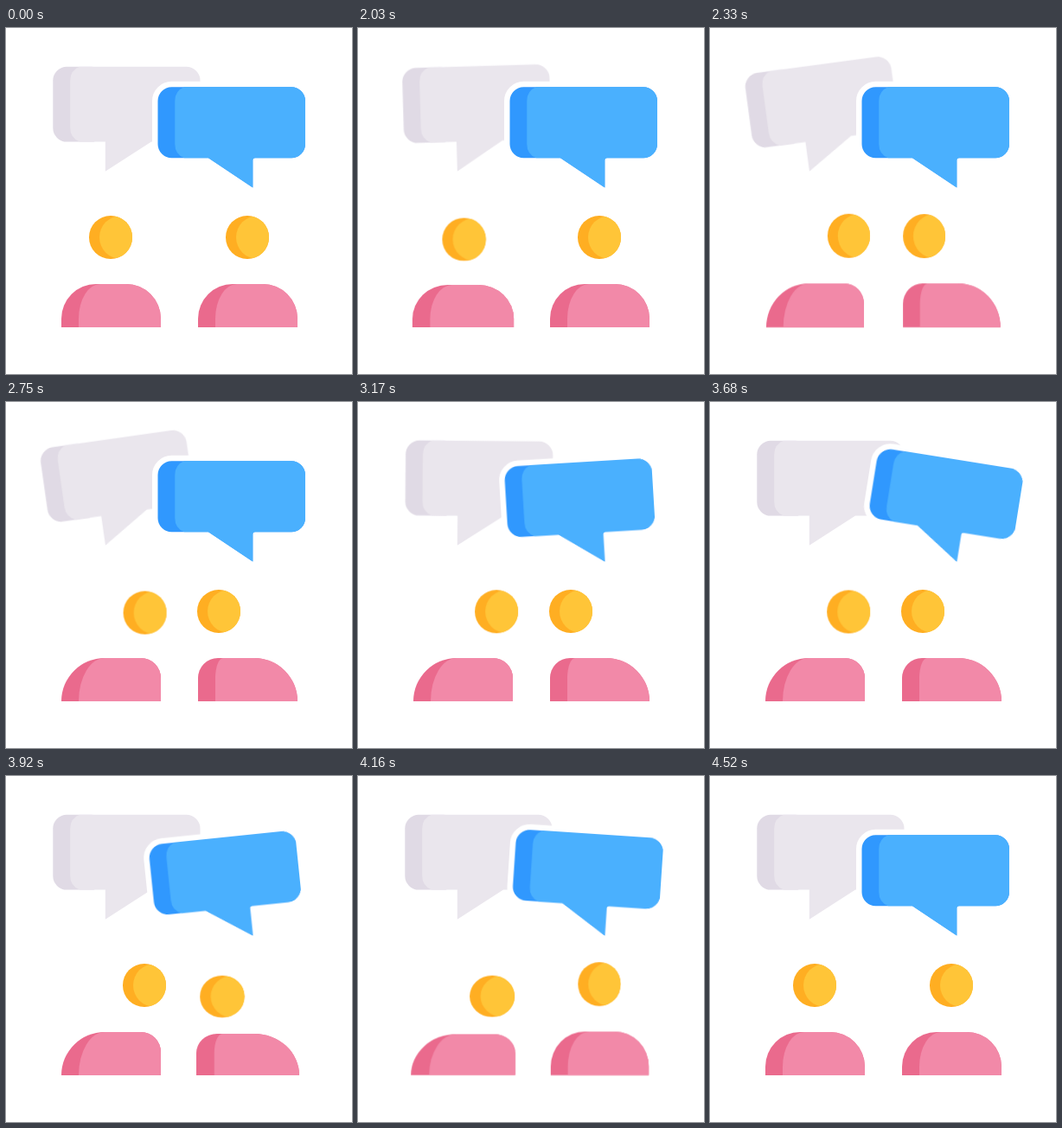
Recreate the animation shown at these times as an HTML page. Size 400x400 px, loop 4.55 s.

```html
<!DOCTYPE html>
<html lang="en">
<head>
<meta charset="utf-8">
<title>Conversation</title>
<style>
  html, body { margin: 0; width: 100%; height: 100%; overflow: hidden; background: #fff; }
  #stage { position: relative; width: 400px; height: 400px; overflow: hidden; }
  svg { position: absolute; inset: 0; }

  .bubble, .head, .body, .body i {
    animation: 4.55s cubic-bezier(.36, 0, .64, 1) infinite;
  }

  /* Bubbles swing around the tip of their tail */
  .bubble { animation-name: swing; }
  .grey { transform-origin: 115px 165px; }
  .blue { transform-origin: 285px 184px; animation-delay: -3.43s; }
  @keyframes swing {
    0% { transform: rotate(0); }
    43.96% { transform: rotate(0); animation-timing-function: cubic-bezier(.3, .1, .6, 1); }
    49.01% { transform: rotate(-18deg); }
    54.73% { transform: rotate(13.5deg); }
    60% { transform: rotate(-8.3deg); }
    65.49% { transform: rotate(4.5deg); }
    70.77%, 100% { transform: rotate(0); }
  }

  .head, .body, .head i, .body i { position: absolute; overflow: hidden; }
  .head { top: 217px; width: 49.5px; height: 49.5px; border-radius: 50%; background: #ffae22; }
  .head i { left: 12px; top: -.5px; width: 50px; height: 50px; border-radius: 50%; background: #ffc538; }
  .body {
    top: 296px; width: 114.5px; height: 49.7px; background: #ea6a8d;
    border-radius: 40px 40px 0 0; transform-origin: 50% 100%;
  }
  .body i { inset: 0 0 0 20px; background: #f289a8; border-radius: 25px 0 0 0 / 40px 0 0 0; }

  .head.left { left: 96.2px; animation-name: head-left; }
  .head.right { left: 254.4px; animation-name: head-right; }
  .body.left { left: 63.8px; animation-name: body-left; }
  .body.right { left: 221.8px; animation-name: body-right; }
  .left i { animation-name: light-left; }
  .right i { animation-name: light-right; }
  .head i { animation: none; }

  @keyframes head-left {
    0% { transform: none; }
    43.96% { transform: translate(0, 0) scale(1); animation-timing-function: cubic-bezier(.4, .2, .7, .9); }
    46.59% { transform: translate(8px, 12px) scale(1.04, .96); }
    50.55% { transform: translate(39.5px, -2px) scale(.98, 1.02); }
    53.63%, 58.9%, 70.33%, 81.76%, 88.57% { transform: translate(39px, 0) scale(1); }
    64.62%, 76.04% { transform: translate(42.5px, 9px) scale(1); }
    91.76% { transform: translate(34px, 13px) scale(1.04, .96); }
    95.38% { transform: translate(0, -2px) scale(.98, 1.02); }
    98.9%, 100% { transform: none; }
  }
  @keyframes head-right {
    0%, 44.62% { transform: translate(0, 0) scale(1); }
    47.25% { transform: translate(-6px, 12px) scale(1.04, .96); }
    51.43% { transform: translate(-31.5px, -1.5px) scale(.98, 1.02); }
    54.51%, 83.52% { transform: translate(-33px, 0) scale(1); }
    86.26% { transform: translate(-29px, 13px) scale(1.03, .97); }
    90.33% { transform: translate(0, -2px) scale(.98, 1.02); }
    93.41%, 100% { transform: none; }
  }

  /* Squash, reshape the shoulders, stretch, settle */
  @keyframes body-left {
    0% { transform: scale(1); border-radius: 40px 40px 0 0; }
    43.96% { transform: scale(1); border-radius: 40px 40px 0 0; animation-timing-function: ease-out; }
    46.59% { transform: scale(1.05, .95); border-radius: 40px 40px 0 0; }
    50.55% { transform: scale(.98, 1.015); border-radius: 50px 23px 0 0; }
    53.63%, 88.57% { transform: scale(1); border-radius: 50px 23px 0 0; }
    91.76% { transform: scale(1.05, .95); border-radius: 50px 23px 0 0; }
    95.38% { transform: scale(.98, 1.015); border-radius: 40px 40px 0 0; }
    98.9%, 100% { transform: scale(1); border-radius: 40px 40px 0 0; }
  }
  @keyframes body-right {
    0%, 44.62% { transform: scale(1); border-radius: 40px 40px 0 0; }
    47.25% { transform: scale(1.05, .95); border-radius: 40px 40px 0 0; }
    51.43% { transform: scale(.98, 1.015); border-radius: 23px 50px 0 0; }
    54.51%, 83.52% { transform: scale(1); border-radius: 23px 50px 0 0; }
    86.26% { transform: scale(1.035, .96); border-radius: 23px 50px 0 0; }
    90.33% { transform: scale(.98, 1.015); border-radius: 40px 40px 0 0; }
    93.41%, 100% { transform: scale(1); border-radius: 40px 40px 0 0; }
  }
  @keyframes light-left {
    0%, 46.59%, 95.38%, 100% { border-radius: 25px 0 0 0 / 40px 0 0 0; }
    50.55%, 91.76% { border-radius: 30px 0 0 0 / 50px 0 0 0; }
  }
  @keyframes light-right {
    0%, 47.25%, 90.33%, 100% { border-radius: 25px 0 0 0 / 40px 0 0 0; }
    51.43%, 86.26% { border-radius: 9px 0 0 0 / 23px 0 0 0; }
  }
</style>
</head>
<body>
<div id="stage">
  <svg width="400" height="400" viewBox="0 0 400 400">
    <g class="bubble grey">
      <rect x="54.3" y="44.8" width="60" height="86.8" rx="16" fill="#e0dae5"/>
      <path fill="#eae6ed" d="M85 44.8H208.5a16 16 0 0 1 16 16V115.600a16 16 0 0 1-16 16H168L114.800 165.800V131.600H85Q74.200 127 74.200 115.600V60.800Q74.200 49 85 44.800Z"/>
    </g>
    <g class="bubble blue">
      <path id="blue" fill="#3098fe" stroke="#fff" stroke-width="13" stroke-linejoin="round" paint-order="stroke"
        d="M191.500 68.300H330a16 16 0 0 1 16 16V134.300a16 16 0 0 1-16 16H288Q285.300 150.300 285.300 153V184.500L234 150.300H191.500a16 16 0 0 1-16-16V84.300a16 16 0 0 1 16-16Z"/>
      <path fill="#4ab0fe" d="M206 68.300H330a16 16 0 0 1 16 16V134.300a16 16 0 0 1-16 16H288Q285.300 150.300 285.300 153V184.500L234 150.300H206Q195.300 146 195.300 134.300V84.300Q195.300 72.500 206 68.300Z"/>
    </g>
  </svg>
  <div class="head left"><i></i></div>
  <div class="head right"><i></i></div>
  <div class="body left"><i></i></div>
  <div class="body right"><i></i></div>
</div>
</body>
</html>
```
